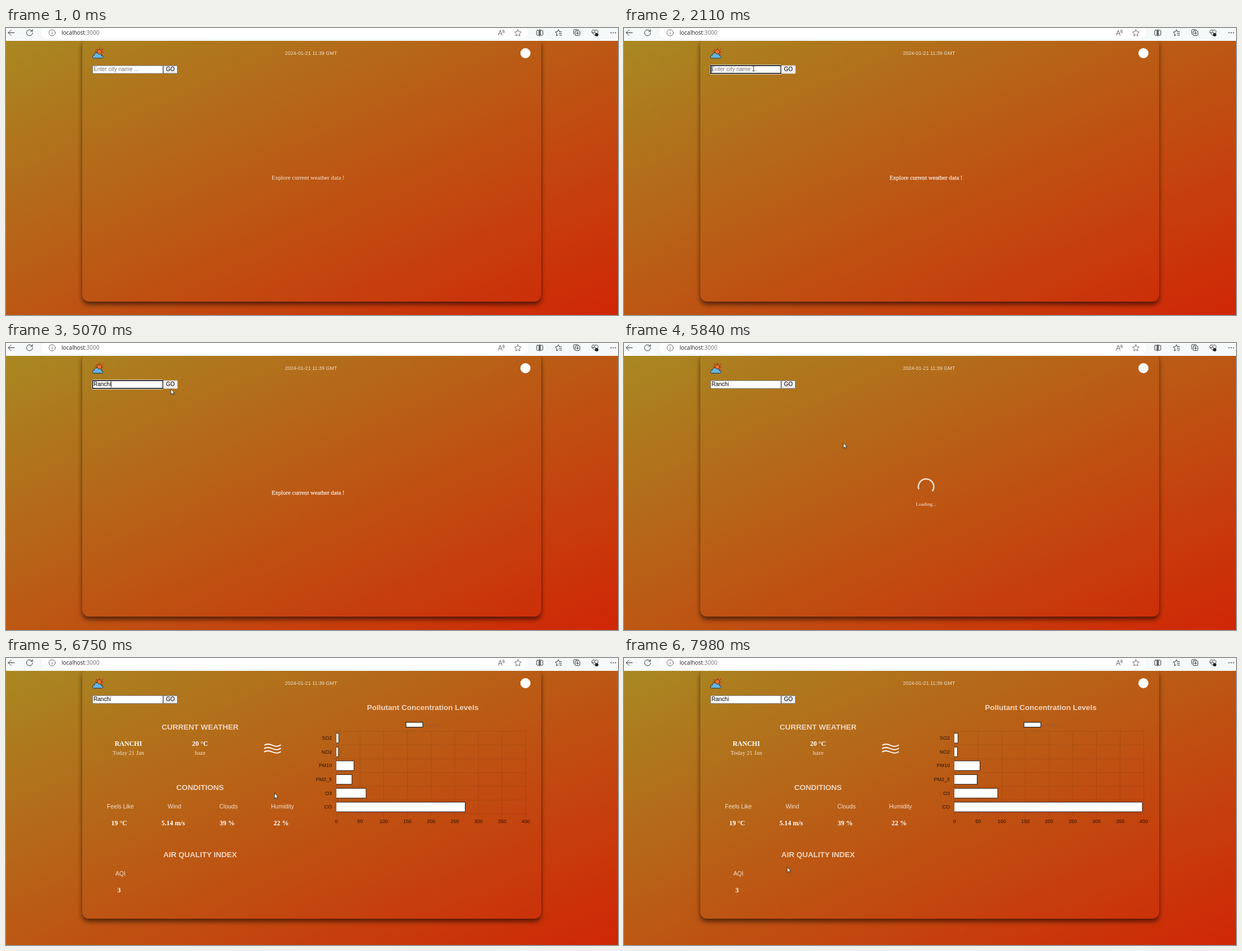
An HTML page for the animation above (8000 ms loop, 1091 by 513 pixels).

```html
<!DOCTYPE html>
<html lang="en">
<head>
<meta charset="utf-8">
<title>Weather dashboard</title>
<style>
  html, body { margin: 0; width: 100%; height: 100%; overflow: hidden; }
  body { background: linear-gradient(to bottom right, #a88822, #d02606) 0 23px / 1091px 490px no-repeat; }
  #card {
    position: absolute; left: 136px; top: 18px; width: 818px; height: 471px;
    border-radius: 12px; box-shadow: 0 5px 9px rgba(0, 0, 0, .6);
  }
  svg { position: absolute; left: 0; top: 0; }
  text { font: 10px "Liberation Sans", Arial, sans-serif; white-space: pre; }
  .mid { text-anchor: middle; }
  .url { font-family: "Open Sans", sans-serif; }
  .date { font-size: 9px; fill: #eedfcb; }
  .head { font-weight: bold; font-size: 13.5px; fill: #efd5bf; }
  .label { font-size: 10.5px; fill: #f3e0d0; }
  .value { font: bold 12px "Liberation Serif", Times, serif; fill: #fff; }
  .note { font: 10.5px "Liberation Serif", Times, serif; fill: #f3e0d0; }
  .axis { font-size: 9px; fill: #2b1206; }
  .line { fill: none; stroke: #333; stroke-width: 1; stroke-linecap: round; stroke-linejoin: round; }
</style>
</head>
<body>
<div id="card"></div>
<svg id="stage" width="1091" height="513" viewBox="0 0 1091 513">
  <!-- browser bar -->
  <rect width="1091" height="23" fill="#f6f9f9"/>
  <rect x="62" y="-3" width="870" height="23" rx="11.5" fill="#fff" stroke="#e9eded" stroke-width=".6"/>
  <g class="line">
    <path d="M15 8.5H4M9 3.5L4 8.5L9 13.5"/>
    <path d="M46.5 5.5A5.4 5.4 0 1 0 47.4 8.5M47.2 2.8V6H44"/>
    <g stroke="#666"><circle cx="82.3" cy="8.5" r="5.6"/><path d="M82.3 8V11.3M82.3 5.8V6"/></g>
    <path stroke="#666" d="M877.5 13L881 4L884.5 13M878.8 10H883.2M885.3 4Q887 6 885.8 8.3M887 3Q889.4 6 887.8 9"/>
    <path id="star" stroke="#666" d="M912.5 2.8L914.3 6.6L918.4 7.1L915.4 10L916.1 14.1L912.5 12.1L908.9 14.1L909.6 10L906.6 7.1L910.7 6.6Z"/>
    <path d="M947.5 4H950V13H947.5Q946 13 946 11.5V5.5Q946 4 947.5 4ZM952.8 4H955.5Q957 4 957 5.5V11.5Q957 13 955.5 13H952.8ZM951.4 2.5V14.5"/>
    <path d="M986.5 6.6L984.7 2.8L983 6.6L979 7.1L982 10L981.2 14L984 12.4M986.5 6.8H990.5M986 10H990.5M987 13H990.5"/>
    <rect x="1014.5" y="5" width="8.5" height="8.5" rx="1.8"/>
    <path d="M1012.8 11.3Q1011.8 11 1011.8 9.5V4.7Q1011.8 2.7 1013.8 2.7H1018.5Q1020 2.7 1020.3 3.6M1018.8 7V11.5M1016.5 9.2H1021"/>
    <path d="M1050 13.5L1045.2 8.7C1042.5 5.5 1047 1.3 1050 4.7C1053 1.3 1057.5 5.5 1054.8 8.7M1044.5 8.3H1048L1049.5 6L1051 9.5"/>
  </g>
  <circle cx="1053" cy="12" r="3" fill="#222"/>
  <g fill="#333"><circle cx="1078.5" cy="8.5" r="1"/><circle cx="1082.5" cy="8.5" r="1"/><circle cx="1086.5" cy="8.5" r="1"/></g>
  <text class="url" x="99" y="12.3" fill="#222">localhost<tspan fill="#707070">:3000</tspan></text>

  <!-- card header -->
  <path d="M167 35V38M160.5 37.5L162.5 39.5M173 37L171 39.5M174 43H171M172.5 48.5L170.5 46.5M158.5 42H161" stroke="#c63a24" stroke-width="1.5"/>
  <circle cx="166.3" cy="42.8" r="4.2" fill="#f0702c" stroke="#5c1d12"/>
  <path d="M156.8 54C153.3 53.8 153.4 48.6 157.4 48.6C157.5 43.8 164 42.5 165.4 46.8C168.4 45.4 170.5 47.2 170 49.4C174 49.6 173.6 54 170.6 54Z" fill="#67b4de" stroke="#1d2d3a"/>
  <text class="mid date" x="543.8" y="48">2024-01-21 11:39 GMT</text>
  <circle cx="926" cy="45" r="9" fill="#fff"/>

  <!-- search form -->
  <rect id="ring" x="152.8" y="65.4" width="128.4" height="17.6" rx="2.5" fill="#fff"/>
  <rect id="field" x="154.4" y="67.2" width="125.4" height="14" fill="#fff"/>
  <text id="typed" x="156" y="77.3"></text>
  <path id="caret" d="M0 68.5V79.5" stroke="#000" stroke-width=".8"/>
  <rect id="button" x="280.6" y="67.2" width="25" height="14" rx="1" fill="#efefef"/>
  <text class="mid" x="293.1" y="77.3">GO</text>

  <text id="hint" class="mid" x="538.4" y="270.8" fill="#f6e8da" stroke="#f6e8da" style="font:10.7px 'Liberation Serif',Times,serif">Explore current weather data !</text>

  <g id="loading">
    <path id="spinner" fill="none" stroke="#f3dfd2" stroke-width="2.6"/>
    <text class="mid" x="538.5" y="291" fill="#f6e8da" style="font:9px 'Liberation Serif',Times,serif">Loading...</text>
  </g>

  <g id="result">
    <path d="M460.5 156q6-4 14.5 0t15-.7m-30 6.700q6-4 15 0t15-.7m-30 6.700q6-4 15 0t15-.7" fill="none" stroke="#fff" stroke-width="1.8"/>
    <rect x="713" y="115" width="30" height="8.600" fill="#fff" stroke="#111"/>
    <text x="748" y="122.500" fill="#a35a30" style="font-size:9px">Levels</text>
    <path id="grid" fill="none" stroke="#000" stroke-opacity=".11" stroke-width=".9"/>
  </g>
  <g id="arrow"><path d="M0 0V9.6L2.300 7.500L3.800 10.900L5.300 10.200L3.900 7H6.900Z" fill="#fff" stroke="#111" stroke-width=".8"/></g>
  <g id="beam"><path d="M-2-4.500H-.5L0-4L.5-4.500H2M0-4V4M-2 4.500H-.5L0 4L.5 4.500H2" fill="none" stroke="#222" stroke-width=".9"/></g>
</svg>
<script>
const LOOP = 8000, FOCUS = 2060, BLINK = 510, CLICK = 5350, READY = 6500;
const $ = id => document.getElementById(id);

function add(name, attrs, content = '') {
  const el = document.createElementNS('http://www.w3.org/2000/svg', name);
  for (const key in attrs) el.setAttribute(key, attrs[key]);
  el.textContent = content;
  return $('result').appendChild(el);
}
const label = (cls, x, y, content) => add('text', { class: 'mid ' + cls, x, y }, content);

// Result panel
label('head', 743, 92.5, 'Pollutant Concentration Levels');
label('head', 346, 128, 'CURRENT WEATHER');
label('head', 346, 235.8, 'CONDITIONS');
label('head', 346, 355.8, 'AIR QUALITY INDEX');
label('value', 218, 157, 'RANCHI');
label('note', 218, 173, 'Today 21 Jan');
label('value', 346, 157, '20 °C');
label('note', 346, 173, 'haze');
[['Feels Like', '19 °C'], ['Wind', '5.14 m/s'], ['Clouds', '39 %'], ['Humidity', '22 %']].forEach(([name, value], i) => {
  label('label', 204 + i * 96.3, 268.6, name);
  label('value', 201.8 + i * 96.2, 298.8, value);
});
label('label', 204, 388.5, 'AQI');
label('value', 201.5, 419, '3');

// Bar chart
const left = 589, top0 = 131, row = 24.6, tick = 42.2;
let grid = '';
for (let i = 0; i < 9; i++) {
  grid += `M${left + i * tick} ${top0}V284`;
  label('axis', left + i * tick, 294.6, i * 50);
}
for (let i = 0; i < 7; i++) grid += `M583 ${top0 + i * row}H${left + 8 * tick}`;
$('grid').setAttribute('d', grid);

const bars = [['SO2', 7.5], ['NO2', 6.5], ['PM10', 54], ['PM2_5', 48], ['O3', 91.5], ['CO', 397]].map(([name, level], i) => {
  const y = top0 + (i + .5) * row;
  label('axis', 581, y + 2.9, name).style.textAnchor = 'end';
  return { y, width: level / 50 * tick, el: add('path', { fill: '#fff', stroke: '#111', 'stroke-width': .9 }) };
});

// Pointer path: time, x, y
const path = [
  [390, 878, 444], [450, 856, 443], [580, 856, 443], [860, 374, 146], [1060, 374, 146],
  [1480, 236, 55], [1550, 232.7, 56.7], [1900, 231, 72.5], [4310, 231, 72.5], [4520, 265, 38],
  [4720, 386, 100], [4860, 370, 124], [5070, 293.8, 82.3], [5210, 293.5, 76], [5400, 293.5, 80],
  [5500, 293.5, 84], [5840, 391, 178.5], [6050, 393, 181], [6750, 479, 242], [6980, 410, 180],
  [7200, 277, 122], [7640, 400, 249], [7720, 400, 249], [7980, 291, 373.7], [8000, 291, 373.7]
];
const keys = [[3170, 'R'], [3500, 'Ra'], [3630, 'Ran'], [3780, 'Ranc'], [3900, 'Ranch'], [4050, 'Ranchi']];

function pointer(t) {
  const i = Math.max(1, path.findIndex(p => p[0] > t));
  const [t0, x0, y0] = path[i - 1], [t1, x1, y1] = path[i];
  const k = Math.max(0, (t - t0) / (t1 - t0));
  return [x0 + (x1 - x0) * k, y0 + (y1 - y0) * k];
}
const show = (id, on) => { $(id).style.display = on ? '' : 'none'; };
const set = (id, attr, value) => $(id).setAttribute(attr, value);

function drawForm(t) {
  const focused = t >= FOCUS && t < CLICK;
  const [since, text] = keys.filter(k => k[0] <= t).pop() || [FOCUS, ''];
  show('ring', focused);
  set('field', 'stroke', focused ? '#101010' : '#767676');
  set('field', 'stroke-width', focused ? 1.7 : 1);
  set('button', 'stroke', focused ? '#d5cdc4' : '#6b6b6b');
  $('typed').textContent = text || 'Enter city name ...';
  set('typed', 'fill', text ? '#000' : '#757575');
  show('caret', focused && Math.floor((t - since) / BLINK) % 2 === 0);
  set('caret', 'transform', `translate(${156.4 + (text ? $('typed').getComputedTextLength() : 0)})`);
}

function drawSpinner(t) {
  const start = (160 + (t - 5840) * .36) * Math.PI / 180, end = start + 236 * Math.PI / 180;
  const at = a => `${538.5 + 13.7 * Math.cos(a)} ${256.8 + 13.7 * Math.sin(a)}`;
  set('spinner', 'd', `M${at(start)}A13.7 13.7 0 1 1 ${at(end)}`);
}

function drawBars(t) {
  const x = Math.min(1, Math.max(0, (t - READY) / 1000));
  const grow = 1 - (1 - x) ** 4;
  for (const { y, width, el } of bars)
    el.setAttribute('d', `M${left} ${y - 8.6}h${width * grow}v17.200H${left}`);
}

function drawPointer(t) {
  const [x, y] = pointer(t);
  const inField = x > 154 && x < 280 && y > 66 && y < 82;
  show('arrow', t >= 390 && !inField);
  show('beam', t >= 390 && inField);
  for (const id of ['arrow', 'beam']) set(id, 'transform', `translate(${x} ${y})`);
}

function frame() {
  const t = performance.now() % LOOP;
  drawForm(t);
  show('hint', t < CLICK);
  set('hint', 'stroke-width', t < FOCUS ? 0 : .25);
  show('loading', t >= CLICK && t < READY);
  drawSpinner(t);
  show('result', t >= READY);
  drawBars(t);
  $('card').style.height = (t < READY ? 471 : 447.5) + 'px';
  drawPointer(t);
  requestAnimationFrame(frame);
}
frame();
</script>
</body>
</html>
```
